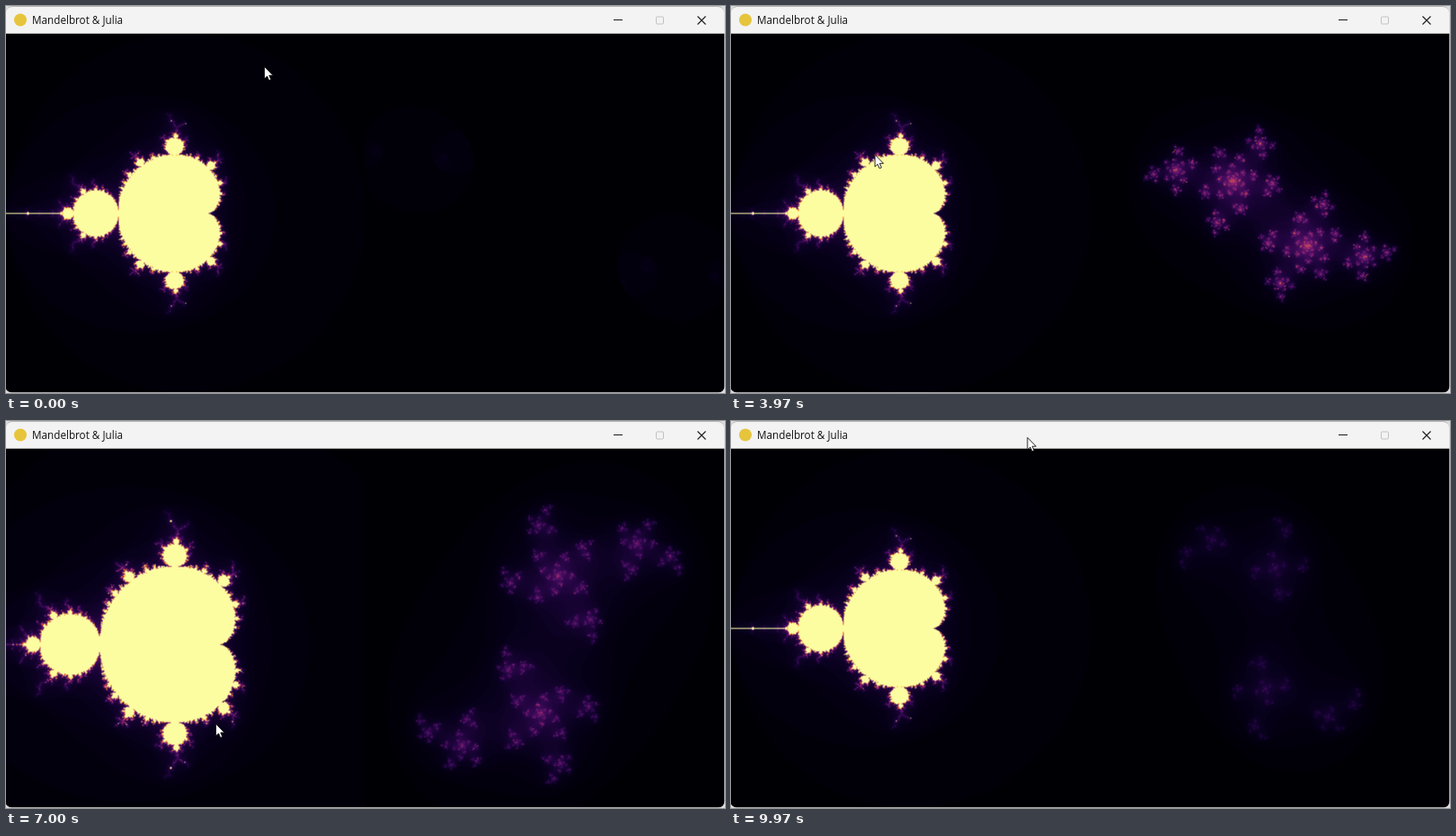
An HTML page with a canvas for the animation above (10 s loop, 800x431 px).

```html
<!DOCTYPE html>
<html lang="en">
<head>
<meta charset="utf-8">
<title>Mandelbrot &amp; Julia</title>
<style>
  html, body { margin: 0; width: 100%; height: 100%; overflow: hidden; background: #dcdcdc; }
  #stage { position: relative; width: 800px; height: 431px; overflow: hidden; }
  #bar {
    position: absolute; left: 0; top: 0; width: 799px; height: 31px; box-sizing: border-box;
    background: #f3f3f3; border-top: 1px solid #b4b4b4; border-radius: 7px 7px 0 0;
  }
  #bar span {
    position: absolute; left: 29px; top: 6px; color: #111; white-space: nowrap;
    font: 11.7px/17px "Open Sans", "Noto Sans", sans-serif;
  }
  canvas {
    position: absolute; left: 0; top: 31px;
    transform: translate(-.5px, -.5px); border-radius: 0 0 7px 7px;
  }
  svg { position: absolute; left: 0; top: 0; }
</style>
</head>
<body>
<div id="stage">
  <div id="bar"><span>Mandelbrot &amp; Julia</span></div>
  <canvas id="view" width="800" height="400"></canvas>
  <svg width="800" height="431" fill="none">
    <circle cx="16" cy="15.5" r="7" fill="#e6c53c"/>
    <path d="M676 15.5h10M769.5 11.5l9 9M778.5 11.5l-9 9" stroke="#1a1a1a" stroke-width="1.1"/>
    <rect x="723.5" y="12" width="8" height="8" rx="1" stroke="#c2c2c2"/>
    <path id="cursor" d="M.5 .5V14L3.6 11.2 5.6 15.8 7.8 14.9 5.8 10.3H10Z" fill="#fff" stroke="#111" stroke-width=".9"/>
  </svg>
</div>
<script>
const LOOP = 10000, STEP = 30, LAG = 150, SIZE = 400, TOP = 31, MAX = 100;
const ANCHOR = { x: 186, y: 177 };

// pointer stops: time, x, y
const PATH = [
  [0, 287, 67], [1490, 224.5, 173.5], [1640, 219, 172],
  [2240, 199.5, 156], [2390, 189, 156], [3820, 154.5, 165.3], [3970, 160, 165],
  [4150, ANCHOR.x, ANCHOR.y], [6150, 257.2, 209.3], [6300, 257, 336],
  [7760, 206.2, 337.6], [7910, 235, 322], [8800, ANCHOR.x, ANCHOR.y],
  [9820, 251, 171], [9970, 335, 7]
];

const ctx = document.getElementById("view").getContext("2d");
const cursor = document.getElementById("cursor");
const image = ctx.createImageData(2 * SIZE, SIZE);
const pixels = new Uint32Array(image.data.buffer);
const clamp = (v, lo, hi) => Math.min(hi, Math.max(lo, v));

// black, violet, orange, pale yellow
const palette = Uint32Array.from({ length: MAX + 1 }, (_, n) => {
  const t = n / MAX;
  const r = Math.sin(Math.PI / 2 * Math.min(1, t / .8)) ** 1.5;
  const g = t * t;
  const b = .015 + .43 * Math.sin(Math.PI * Math.min(1, t / .73)) + 10 * Math.max(0, t - .75) ** 2;
  return [b, g, r].reduce((rgb, v) => rgb << 8 | Math.round(252 * v), 255);
});

// index of the iteration that leaves the disc of radius 2
function escapeTime(x, y, cx, cy) {
  for (let n = 0; n < MAX; n++) {
    const xx = x * x - y * y + cx;
    y = 2 * x * y + cy;
    x = xx;
    if (x * x + y * y > 4) return n;
  }
  return MAX;
}

function paint(left, view, count) {
  for (let row = 0; row < SIZE; row++) {
    const y = (row + TOP - view.y) / view.scale;
    for (let col = 0; col < SIZE; col++) {
      const x = (col - view.x) / view.scale;
      pixels[row * 2 * SIZE + left + col] = palette[count(x, y)];
    }
  }
}

function pointer(t) {
  const i = Math.max(1, PATH.findIndex(stop => stop[0] >= t));
  const [t0, x0, y0] = PATH[i - 1], [t1, x1, y1] = PATH[i];
  const u = (t - t0) / (t1 - t0);
  return { x: x0 + (x1 - x0) * u, y: y0 + (y1 - y0) * u };
}

// three wheel clicks in, later three clicks out
function viewAt(t) {
  const clicks = since => clamp(Math.floor((t - since) / 100), 0, 3);
  const k = 1.1 ** (clicks(4000) - clicks(8600));
  return {
    x: ANCHOR.x + (200 - ANCHOR.x) * k,
    y: ANCHOR.y + (231 - ANCHOR.y) * k,
    scale: 100 * k
  };
}

let lastTime = -1, lastScale = 0;

function draw(t) {
  const view = viewAt(t), tip = pointer(t);
  // the Julia parameter trails the pointer and starts in the window corner
  const seed = t < LAG ? { x: 0, y: TOP } : pointer(t - LAG);
  const cx = (seed.x - view.x) / view.scale, cy = (seed.y - view.y) / view.scale;
  if (view.scale !== lastScale) {
    paint(0, view, (x, y) => escapeTime(0, 0, x, y));
    lastScale = view.scale;
  }
  paint(SIZE, view, (x, y) => escapeTime(x, y, cx, cy));
  ctx.putImageData(image, 0, 0);
  cursor.setAttribute("transform", `translate(${tip.x} ${tip.y})`);
}

const start = performance.now();
function tick() {
  const t = Math.floor((performance.now() - start) % LOOP / STEP) * STEP;
  if (t !== lastTime) draw(lastTime = Math.min(t, LOOP - STEP));
  requestAnimationFrame(tick);
}
tick();
</script>
</body>
</html>
```
